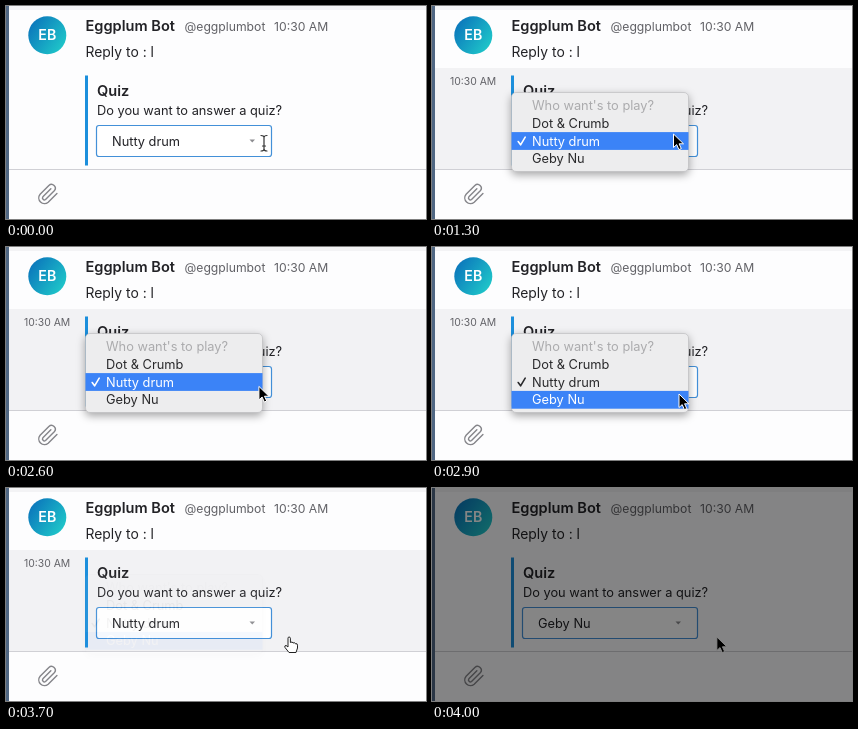
An HTML page that plays this animation: 420x213 px, repeating every 4100 ms.

```html
<!DOCTYPE html>
<html lang="en">
<head>
<meta charset="utf-8">
<style>
  html, body { margin: 0; width: 100%; height: 100%; overflow: hidden; background: #fdfdfe; }
  svg { display: block; width: 420px; height: 213px; font: 12.8px Inter, "Open Sans", sans-serif; fill: #222226; }
  .strong { font-weight: 600; font-size: 14.6px; }
  .muted { fill: #626267; font-size: 12.2px; }
  #panel { filter: drop-shadow(0 3px 4px rgba(0, 0, 0, .35)); }
  .ink { fill: none; stroke-linecap: round; stroke-linejoin: round; }
</style>
</head>
<body>
<svg viewBox="0 0 420 213">
  <defs>
    <linearGradient id="teal" x1="0" y1=".15" x2="1" y2=".85">
      <stop offset="0" stop-color="#0a72bb"/>
      <stop offset="1" stop-color="#20ccca"/>
    </linearGradient>
  </defs>

  <rect width="420" height="213" fill="#fdfdfe"/>
  <rect width="420" height="4" fill="#f3f3f5"/>
  <g id="hover">
    <rect y="62" width="420" height="101" fill="#f2f2f4"/>
    <text x="18" y="79" class="muted" style="font-size:10.4px">10:30 AM</text>
  </g>
  <rect y="163" width="420" height="1" fill="#d0d0d5"/>
  <rect width="3" height="213" fill="#506783"/>

  <circle cx="41.3" cy="29.3" r="19" fill="url(#teal)"/>
  <text x="41.3" y="34.3" text-anchor="middle" fill="#fff" font-size="14.2" font-weight="600">EB</text>
  <text x="79.5" y="25" class="strong">Eggplum Bot</text>
  <text x="178.5" y="25" class="muted">@eggplumbot</text>
  <text x="268" y="25" class="muted">10:30 AM</text>
  <text x="79.5" y="51" font-size="13.9">Reply to : l</text>

  <rect x="79" y="69.5" width="3" height="90" fill="#1c8fdc"/>
  <text x="91" y="89.5" class="strong">Quiz</text>
  <text x="91" y="109">Do you want to answer a quiz?</text>
  <rect x="90.5" y="119.5" width="175" height="31" rx="2.5" fill="#fff" stroke="#4390d8" stroke-width="1.2"/>
  <text id="value" x="106" y="140"></text>
  <path d="M243.5 133.5h5.5l-2.75 3z" fill="#8c8c90"/>

  <path class="ink" stroke="#85858a" stroke-width="1.5" transform="translate(30.6 177) scale(.95)"
    d="M21.4 11l-9.2 9.2a6 6 0 0 1-8.5-8.4l9.2-9.2a4 4 0 0 1 5.7 5.6l-9.2 9.2a2 2 0 0 1-2.8-2.8l8.4-8.5"/>

  <g id="menu">
    <rect id="panel" x="79.5" y="86.5" width="177" height="79" rx="4.5" fill="#ededee" stroke="#bdbdc0" stroke-width=".7"/>
    <rect id="mark" x="79.5" width="177" height="17.8" fill="#3b83f7"/>
    <text x="100" y="104" fill="#ababad">Who want's to play?</text>
    <path id="check" class="ink" d="M86.2 135.5l2.4 3.3 4.6-7.6" stroke-width="1.6"/>
  </g>

  <g id="cursor" stroke-linejoin="round">
    <path id="arrow" d="M0 0V13.5L3.2 10.6L5.4 15.6L7.8 14.6L5.6 9.8H10Z" fill="#000" stroke="#fff"/>
    <path id="beam" class="ink" stroke="#333" stroke-width="1.2" d="M-3-7.5Q0-7.5 0-5.5Q0-7.5 3-7.5M0-5.5V6M-3 8Q0 8 0 6Q0 8 3 8M-1.5 3H1.5"/>
    <path id="hand" fill="#fff" stroke="#222" stroke-width="1"
      d="M-2 8V1.2Q-2 0-.9 0T.4 1.2V5.5Q2.6 4.2 3 6Q5 5 5.4 6.8Q7.5 6 7.5 8.2V11L6 15.5H-1L-5 10.5Q-5.8 8.5-4 8.4L-2 10Z"/>
  </g>
  <rect id="dim" width="420" height="213" fill="#000"/>
</svg>

<script>
const $ = id => document.getElementById(id);
const LOOP = 4100, STEP = 100, ROW_TOP = 108.3, ROW = 17.8;
const HOVER = 500, OPEN = 800, PICK = 3600, LEAVE = 3700, DONE = 3800;
const names = ["Dot & Crumb", "Nutty drum", "Geby Nu"];

// time, x, y of the pointer while the menu is in use
const path = [
  [OPEN, 248, 134], [1800, 235, 122], [1900, 235, 122], [2500, 254, 138],
  [2900, 247, 147], [3500, 247, 147], [LEAVE, 284, 149], [LOOP, 285, 149]
];

const rows = names.map((name, i) => {
  const row = document.createElementNS("http://www.w3.org/2000/svg", "text");
  row.setAttribute("x", 100);
  row.setAttribute("y", ROW_TOP + ROW * i + 13.4);
  row.textContent = name;
  $("menu").append(row);
  return row;
});

function pointerAt(t) {
  if (t < OPEN) return [258, 137];
  const i = path.findIndex(p => p[0] > t);
  const [t0, x0, y0] = path[i - 1], [t1, x1, y1] = path[i];
  const u = (t - t0) / (t1 - t0), k = u * u * (3 - 2 * u);
  return [x0 + (x1 - x0) * k, y0 + (y1 - y0) * k];
}

const show = (id, opacity) => $(id).setAttribute("opacity", Number(opacity));

function draw(t) {
  const [x, y] = pointerAt(t);
  const active = Math.max(0, Math.min(2, Math.floor((y - ROW_TOP) / ROW)));
  const shape = t < OPEN ? "beam" : t >= LEAVE && t < DONE ? "hand" : "arrow";

  $("cursor").setAttribute("transform", `translate(${x} ${y})`);
  for (const id of ["beam", "hand", "arrow"]) show(id, id === shape);

  show("hover", t >= HOVER && t < DONE);
  show("menu", t < OPEN || t >= DONE ? 0 : t < PICK ? 1 : t < LEAVE ? .5 : .05);
  $("mark").setAttribute("y", ROW_TOP + ROW * active);
  rows.forEach((row, i) => row.setAttribute("fill", i === active ? "#fff" : "#29292b"));
  $("check").setAttribute("stroke", active === 1 ? "#fff" : "#29292b");
  $("value").textContent = names[t < DONE ? 1 : 2];
  show("dim", Math.max(0, (t - 3760) / 500));
}

function tick() {
  const t = performance.now() % LOOP;
  draw(Math.floor(t / STEP) * STEP);
  requestAnimationFrame(tick);
}
tick();
</script>
</body>
</html>
```
